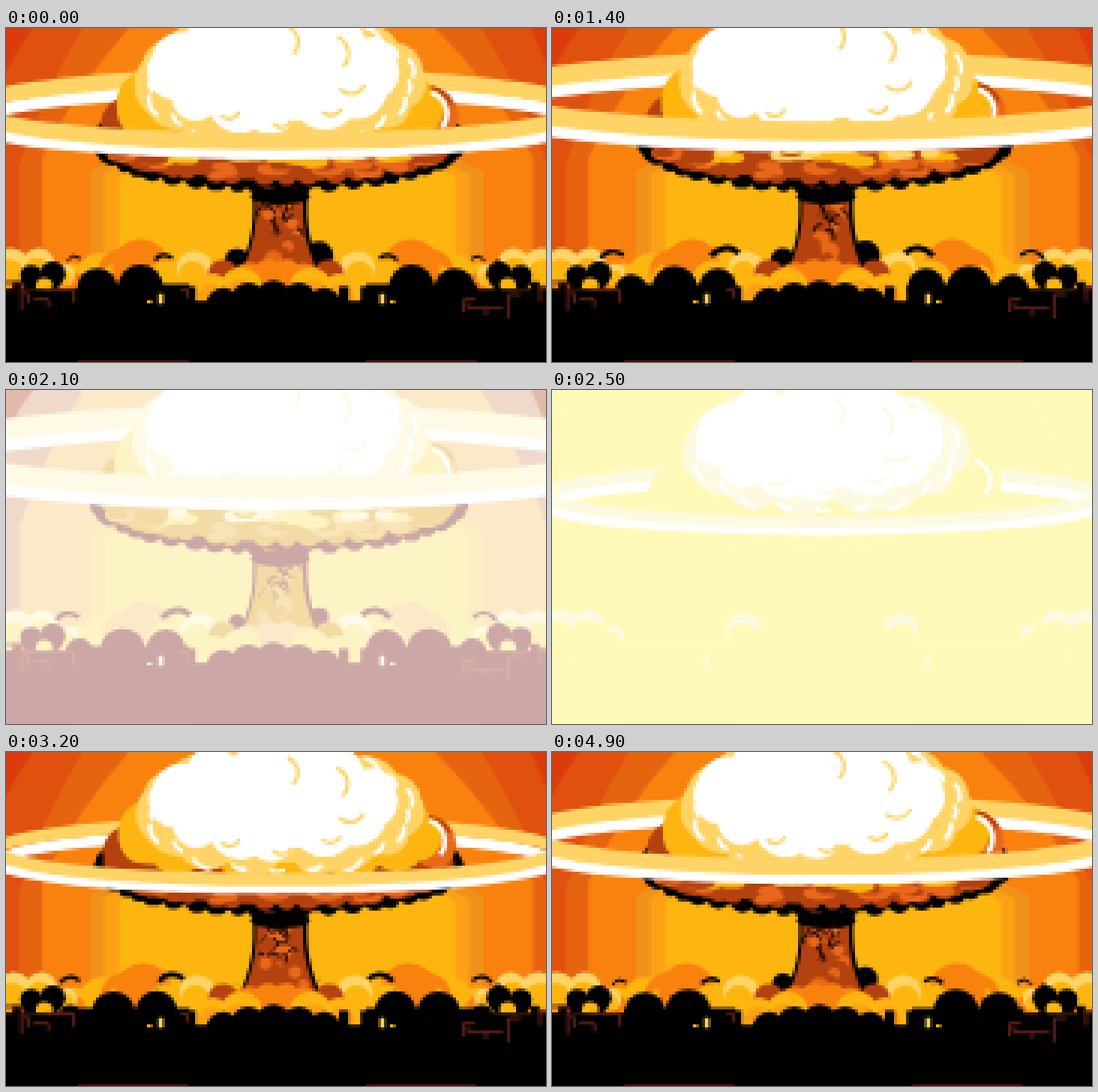
Write an HTML page with a canvas that moves like this. It is 900 px wide and 558 px high and loops after 5100 ms.

```html
<!DOCTYPE html>
<html>
<head>
<meta charset="utf-8">
<style>
html, body { margin: 0; width: 100%; height: 100%; overflow: hidden; background: #000; }
canvas { display: block; width: 900px; height: 560px; image-rendering: pixelated; }
</style>
</head>
<body>
<canvas width="180" height="112"></canvas>
<script>
const ctx = document.querySelector('canvas').getContext('2d');
const LOOP = 5100, PI = Math.PI, TAU = 2 * PI, MID = 450;

// Each colour: normal, bright flash, flash peak
const GLARE = 'fef9b8';
const PALETTE = {
  ink: ['000000', 'cba7a6', GLARE],
  window: ['622018', 'dbb0a4', GLARE],
  red: ['dc3b0d', 'e2b8a8', GLARE],
  rust: ['e0500e', 'eed9ca', GLARE],
  amber: ['e6640f', 'fbe9c8', GLARE],
  sky: ['f9820f', 'fbe9c8', GLARE],
  ochre: ['f0921a', 'fcefc6', GLARE],
  gold: ['fda015', 'fdf3c5', GLARE],
  yellow: ['fdb510', 'fdf4c6', GLARE],
  brown: ['b4420f', 'f3dba6', GLARE],
  orange: ['e8681a', 'f8e4b8', GLARE],
  pale: ['ffd466', 'fefae6', 'fdfae2'],
  white: ['ffffff', 'ffffff', 'ffffff']
};
const rgb = hex => [0, 2, 4].map(i => parseInt(hex.slice(i, i + 2), 16));
const mod = (a, n) => ((a % n) + n) % n;
const seeded = seed => () => (seed = (seed * 16807) % 2147483647) / 2147483647;
let color = {};

function setPalette(level) {
  const i = Math.min(1, Math.floor(level)), f = level - i;
  for (const name in PALETTE) {
    const a = rgb(PALETTE[name][i]), b = rgb(PALETTE[name][i + 1]);
    color[name] = `rgb(${a.map((v, k) => Math.round(v + (b[k] - v) * f))})`;
  }
}

function rect(name, ...box) {
  ctx.fillStyle = color[name];
  ctx.fillRect(...box);
}

function puff(name, x, y, rx, ry = rx) {
  ctx.fillStyle = color[name];
  ctx.beginPath();
  ctx.ellipse(x, y, Math.max(0, rx), Math.max(0, ry), 0, 0, TAU);
  ctx.fill();
}

function arc(name, width, x, y, r, from, to) {
  ctx.strokeStyle = color[name];
  ctx.lineWidth = width;
  ctx.beginPath();
  ctx.arc(x, y, r, from, to);
  ctx.stroke();
}

// An ellipse whose rim is made of n round lumps
function lumpy(name, cx, cy, rx, ry, n, size) {
  const rand = seeded(n * 997 + rx);
  puff(name, cx, cy, rx - size * .5, ry - size * .5);
  for (let i = 0; i < n; i++) {
    const a = (i + rand() * .5) / n * TAU, r = size * (.75 + .5 * rand());
    puff(name, cx + (rx - r) * Math.cos(a), cy + (ry - r) * Math.sin(a), r);
  }
}

// A pair of puffs at distance d on both sides, with a darker lower part
function pair(name, shade, d, y, r) {
  for (const side of [-1, 1]) {
    puff(name, MID + side * d, y, r);
    puff(shade, MID + side * (d + r * .12), y + r * .4, r * .8);
  }
}

function band(name, top, y, left, right, topY = 0) {
  const topRight = 920 - top;
  ctx.fillStyle = color[name];
  ctx.beginPath();
  ctx.moveTo(top, topY);
  ctx.quadraticCurveTo(left + (top - left) * .4, topY + (y - topY) * .45, left, y);
  ctx.lineTo(left, 470);
  ctx.lineTo(right, 470);
  ctx.lineTo(right, y);
  ctx.quadraticCurveTo(right + (topRight - right) * .4, topY + (y - topY) * .45, topRight, topY);
  ctx.fill();
}

function drawSky() {
  rect('red', 0, 0, 900, 560);
  band('rust', 45, 100, -12, 912);
  band('amber', 128, 230, 22, 902);
  band('sky', 205, 215, 61, 878);
  band('ochre', 300, 240, 140, 795, 170);
  band('gold', 320, 245, 163, 772, 170);
  band('yellow', 330, 250, 188, 749, 170);
}

function drawRing(p, front) {
  const rx = 458 + 40 * p + 85 * p * p;
  const half = (name, width, cy, ry, grow) => {
    ctx.strokeStyle = color[name];
    ctx.lineWidth = width;
    ctx.beginPath();
    ctx.ellipse(MID, cy, rx + grow, ry, 0, front ? 0 : PI, front ? PI : TAU);
    ctx.stroke();
  };
  half('white', 18 + 9 * p, 193.5 - 71.5 * p, 41 + 22 * p, front ? 4 : -8);
  half('pale', 18 + 18 * p, 178 - 80 * p, 45 + 17 * p, 0);
}

const stemHalf = y => 45 + 18 * Math.max(0, (y - 300) / 90) ** 2;

function drawStem(u) {
  const swell = 28 * Math.abs(2 * u - .9);
  puff('ink', 385, 388, swell);
  puff('ink', 522, 380, swell * 1.2);
  for (let y = 265; y < 420; y += 5) {
    const w = stemHalf(y);
    rect('ink', 457 - w, y, 2 * w, 6);
    rect('brown', 462 - w, y, 2 * w - 12, 6);
  }
  // Rising smoke curls, darkest near the top
  const rand = seeded(31);
  for (let i = 0; i < 26; i++) {
    const y = 278 + mod(i * 5 - u * 115, 115), r = 7 + 9 * rand();
    const x = 457 + (rand() * 2 - 1) * (stemHalf(y) - r - 4), a = rand() * 3 + 2.5;
    if (i % 2) puff(i % 4 === 1 ? 'orange' : 'brown', x, y, r);
    if (y < 350) arc('ink', 4, x, y, r, a, a + 2);
  }
  puff('ink', 457, 281, 50, 14);
}

function drawCap(k) {
  ctx.save();
  ctx.translate(MID, 275);
  ctx.scale(1 + .03 * k, 1 + .12 * k);
  ctx.translate(-MID, -275);

  // Dark underside with lit billows, brighter towards the top
  lumpy('ink', 455, 190, 312, 86, 46, 17);
  puff('brown', 206, 162, 48);
  puff('orange', 704, 148, 50);
  lumpy('brown', 455, 184, 296, 79, 42, 17);
  const rand = seeded(77);
  for (let i = 0; i < 60; i++) {
    const h = 1 - i / 60, x = rand() * 2 - 1;
    const y = 208 + 42 * h * Math.sqrt(1 - x * x), r = 10 + 9 * rand();
    const lit = h > .4 ? 'orange' : h > .18 ? 'yellow' : 'pale';
    puff(rand() < .36 ? 'brown' : lit, MID + 265 * x, y, r * 1.5, r * .65);
  }
  puff('orange', 718, 160, 32);

  lumpy('yellow', 455, 132, 276, 82, 14, 50);
  lumpy('pale', 457, 90, 244, 117, 15, 52);
  lumpy('white', 446, 72, 210, 107, 13, 46);

  // Highlights follow the rim of the cloud, shadows curl inside it
  for (let i = 0; i < 17; i++) {
    const a = -1.1 + i * .3, r = 20 + 16 * rand();
    arc('white', 7, 457 + 195 * Math.cos(a), 90 + 82 * Math.sin(a), r, a - .6, a + .5);
  }
  for (let i = 0; i < 6; i++) {
    const a = -1.5 + i * .75, r = 18 + 14 * rand(), turn = i < 2 ? -1.2 : .4;
    arc('pale', 6, 450 + 125 * Math.cos(a), 85 + 62 * Math.sin(a), r, turn, turn + 2);
  }
  arc('white', 8, 698, 143, 37, -1.3, .7);
  arc('brown', 6, 700, 145, 46, -1.4, -.4);
  ctx.restore();
}

function drawDust(u) {
  const drift = 12 * (u - .5);
  pair('yellow', 'yellow', 290 + drift, 418, 42);
  pair('sky', 'yellow', 255 + drift, 408, 38);
  pair('sky', 'sky', 222 + drift, 400, 48);
  pair('yellow', 'yellow', 180, 425, 38);
  pair('pale', 'yellow', 132 + drift, 402, 30);
  pair('yellow', 'sky', 335 + drift, 418, 26);
  pair('pale', 'yellow', 438 + drift, 398, 30);
  pair('pale', 'yellow', 392 + drift, 394, 26);
  pair('pale', 'yellow', 350 + drift, 412, 18);
  pair('brown', 'brown', 88, 412, 25);
  pair('yellow', 'gold', 105, 438, 28);
  lumpy('sky', MID, 430, 85, 44, 9, 26);
  pair('yellow', 'gold', 58, 436, 36);

  // Dark crescents roll outward and shrink
  const size = Math.min(1, u / .06) * Math.min(1, 1.15 - .65 * u);
  for (const side of [-1, 1]) {
    const tilt = -PI / 2 + side * .1;
    arc('ink', 10 * size, MID + side * (157 + 36 * u), 399, 31 * size, tilt - .85, tilt + .85);
    arc('ink', 7 * size, MID + side * (350 - 18 * u), 397, 24 * size, tilt - .9, tilt + .9);
  }
}

function drawGround(u) {
  pair('ink', 'ink', 372, 411, 21);
  pair('ink', 'ink', 408, 414, 18);
  pair('yellow', 'yellow', 386, 432, 14);
  for (let i = 0; i < 3; i++) {
    pair('ink', 'ink', 168 + 72 * (u + i), 433 + 3 * i, [31 + 8 * u, 39 - 6 * u, 30 * (1 - u)][i]);
  }
  for (let i = 0; i < 5; i++) puff('ink', 362 + 42 * i, 462 - 13 * Math.sin(i * PI / 4), 28);
  for (let x = 0; x < 900; x += 5) {
    const d = Math.abs(x - MID);
    rect('ink', x, d > 330 ? 436 : d > 145 ? 428 : 456, 6, 130);
  }
  for (const x of [308, 563, 599]) rect('ink', x - 8, 432, 16, 28);
  for (const side of [-1, 1]) rect('ink', MID + side * 432 - 7, 424, 14, 15);
  rect('ink', 818, 385, 4, 50);
  puff('ink', 820, 400, 5);
  for (const x of [254, 623]) rect('pale', x, 444, 8, 17);
  for (const x of [235, 640]) rect('yellow', x, 455, 8, 5);

  // Ruined window frames
  ctx.strokeStyle = color.window;
  ctx.lineWidth = 4.5;
  const hook = (x, y, w, h) => {
    ctx.beginPath();
    ctx.moveTo(x, y + h);
    ctx.lineTo(x, y);
    ctx.lineTo(x + w, y);
    ctx.stroke();
  };
  hook(26, 425, -26, 47);
  hook(38, 444, -8, 16);
  hook(71, 453, -25, 14);
  hook(113, 437, -50, 22);
  hook(303, 437, -12, 15);
  hook(763, 453, 19, 22);
  hook(770, 468, 30, -10);
  hook(800, 468, 28, 12);
  hook(837, 445, 21, 40);
  hook(890, 432, 10, 26);
}

function draw(t) {
  const p = mod(t - 2400, LOOP) / LOOP;
  const u = mod(t - 1000, LOOP) / LOOP;
  const d = Math.abs(t - 2400);
  setPalette(d < 300 ? Math.min(2, 2.5 - d / 200) : Math.max(0, (800 - d) / 500));
  ctx.setTransform(.2, 0, 0, .2, 0, 0);
  drawSky();
  drawRing(p, false);
  drawStem(u);
  drawCap(p - .53);
  drawRing(p, true);
  drawDust(u);
  drawGround(u);
}

function tick() {
  let t = Math.floor(performance.now() % LOOP / 100) * 100;
  if (t === 1500 || t === 5000) t -= 100; // two held steps
  draw(t);
  requestAnimationFrame(tick);
}
tick();
</script>
</body>
</html>
```
